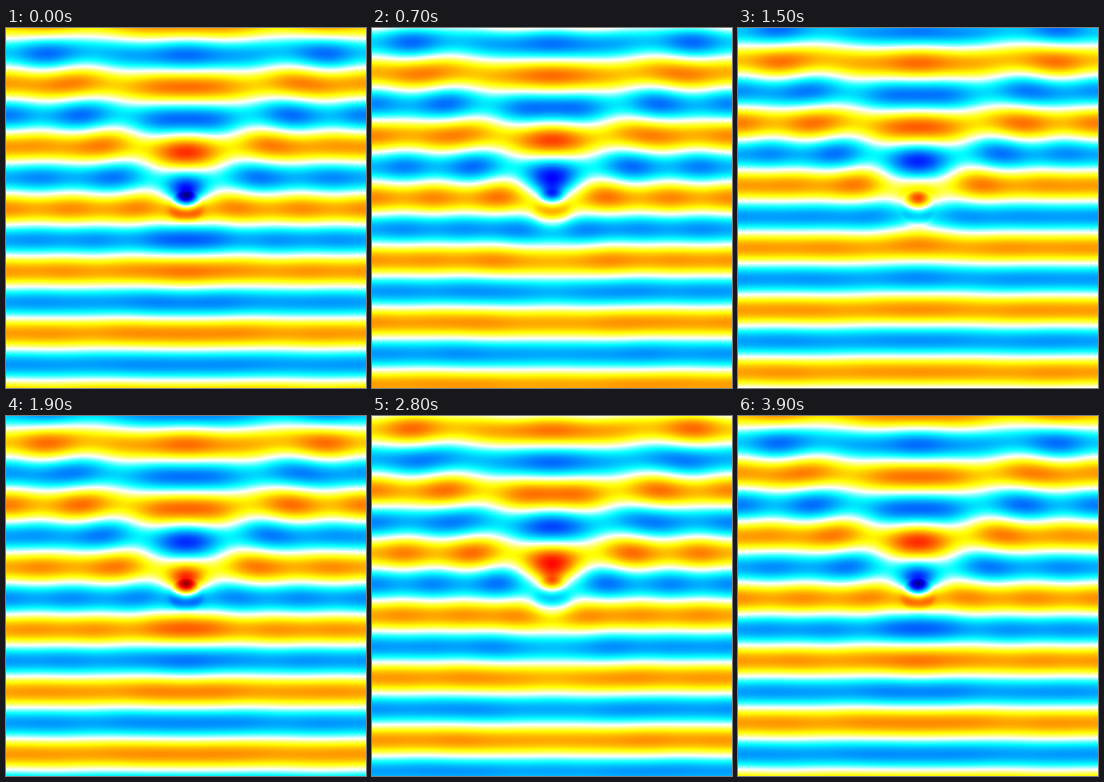
These frames come from a looping animation (360 px wide and 360 px high, 4000 ms). A matplotlib script:

```python
"""Plane wave travelling upwards past a row of small dielectric spheres."""
import numpy as np
import matplotlib.pyplot as plt
from matplotlib.animation import FuncAnimation
from matplotlib.colors import LinearSegmentedColormap

SIZE = 360            # stage and spacing of the spheres, px
WAVELENGTH = 62.3
RADIUS = 17.8
INDEX = 2.0
CREST = 305.5         # height of one incident crest at time zero
PEAK = 2.25           # field at the ends of the colour scale
ORDERS = 5
FRAMES = 40
INTERVAL = 100

K = 2 * np.pi / WAVELENGTH


def radial(rho):
    """Spherical Hankel functions and (rho h)' / rho for orders 0..ORDERS."""
    wave = np.exp(1j * rho)
    h = [-1j * wave / rho, -wave * (rho + 1j) / rho**2]
    for n in range(1, ORDERS):
        h.append((2 * n + 1) / rho * h[n] - h[n - 1])
    slope = [wave / rho]
    slope += [h[n - 1] - n * h[n] / rho for n in range(1, ORDERS + 1)]
    return h, slope


def angular(mu):
    """Mie angle functions pi_n and tau_n of the cosine mu."""
    pi = [np.zeros_like(mu), np.ones_like(mu)]
    for n in range(1, ORDERS):
        pi.append(((2 * n + 1) * mu * pi[n] - (n + 1) * pi[n - 1]) / n)
    tau = [0 * mu]
    tau += [n * mu * pi[n] - (n + 1) * pi[n - 1] for n in range(1, ORDERS + 1)]
    return pi, tau


def mie_terms():
    """Yield order, weight and the outer (a, b) and inner (c, d) factors."""
    x = K * RADIUS
    h, hs = radial(x)
    inner, inner_slope = radial(INDEX * x)
    for n in range(1, ORDERS + 1):
        j, js = h[n].real, hs[n].real
        jm, jms = inner[n].real, inner_slope[n].real
        a = (INDEX**2 * jm * js - j * jms) / (INDEX**2 * jm * hs[n] - h[n] * jms)
        b = (jm * js - j * jms) / (jm * hs[n] - h[n] * jms)
        c = (j - b * h[n]) / jm
        d = (js - a * hs[n]) / jms
        yield n, 1j**n * (2 * n + 1) / (n * (n + 1)), a, b, c, d


def scattered(x, y):
    """Field of one sphere outside it, relative to the wave at its centre."""
    r = np.hypot(x, y)
    h, slope = radial(K * r)
    pi, tau = angular(-y / r)
    return sum(w * (1j * a * pi[n] * slope[n] - b * tau[n] * h[n])
               for n, w, a, b, _, _ in mie_terms())


def internal(x, y):
    """Total field inside a sphere."""
    r = np.hypot(x, y)
    h, slope = radial(INDEX * K * r)
    pi, tau = angular(-y / r)
    return sum(w * (c * tau[n] * h[n].real - 1j * d * pi[n] * slope[n].real)
               for n, w, _, _, c, d in mie_terms())


def solve_field():
    pos = np.arange(SIZE) + 0.5 - SIZE / 2
    x, y = np.meshgrid(pos, pos)
    inside = np.hypot(x, y) < RADIUS
    field = np.exp(-1j * K * y) + scattered(x, y)
    field[inside] = internal(x[inside], y[inside])
    for shift in (-2, -1, 1, 2):
        field += scattered(x - shift * SIZE, y)
    return field * np.exp(1j * K * (CREST - SIZE / 2))


def wave_colors():
    warm = [(0.625, "#ffff00"), (0.875, "#ff0000"), (1.0, "#800000")]
    cold = [(0.0, "#000080"), (0.125, "#0000ff"), (0.375, "#00ffff")]
    return LinearSegmentedColormap.from_list(
        "wave", cold + [(0.5, "#ffffff")] + warm, N=1024)


field = solve_field()

fig = plt.figure(figsize=(SIZE / 100, SIZE / 100), dpi=100)
ax = fig.add_axes([0, 0, 1, 1])
ax.axis("off")
image = ax.imshow(field.real, cmap=wave_colors(), vmin=-PEAK, vmax=PEAK,
                  interpolation="nearest", aspect="auto")


def update(frame):
    phase = 2 * np.pi * frame / FRAMES
    image.set_data((field * np.exp(-1j * phase)).real)
    return [image]


anim = FuncAnimation(fig, update, frames=FRAMES, interval=INTERVAL,
                     repeat=True, repeat_delay=0, blit=False)
plt.show()
```
